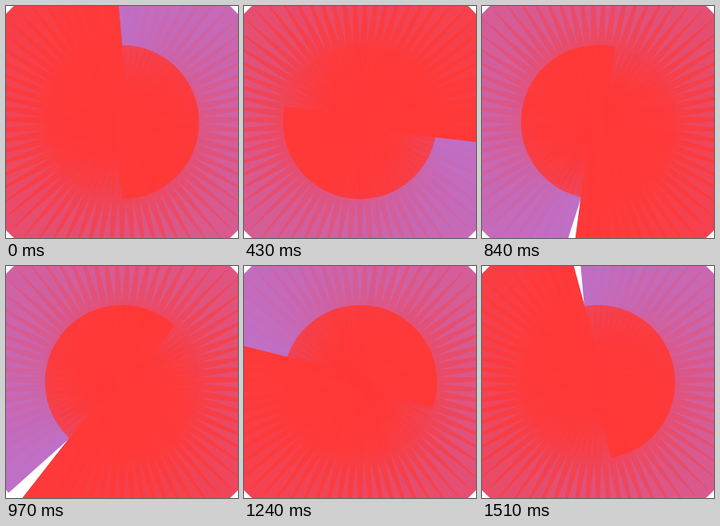
Write an HTML page with a canvas that moves like this. It is 290 by 290 pixels and loops after 1.54 s.

```html
<!DOCTYPE html>
<html lang="en">
<head>
<meta charset="utf-8">
<title>Radial sweep</title>
<style>
  html, body { margin: 0; width: 100%; height: 100%; overflow: hidden; background: #fff; }
  canvas { display: block; }
</style>
</head>
<body>
<canvas id="stage" width="290" height="290"></canvas>
<script>
const ctx = document.getElementById('stage').getContext('2d');

const LOOP = 1540;        // ms
const POSES = 46;         // held poses per loop
const POSE_TICKS = 3.345; // length of a pose in 10 ms ticks
const BLADES = 71;
const LIFE = BLADES - 0.7; // a blade drops out shortly before it is renewed
const WIDTH = 17.5;
const TAIL = 96;          // reach behind the centre
const REACH = 198;        // reach ahead of the centre
const OLD = '#be70c8';
const FRESH = '#ff3938';

function drawBlade(index, color, alpha) {
  ctx.save();
  ctx.translate(145, 145);
  ctx.rotate(-Math.PI / 2 + index * 2 * Math.PI / BLADES);
  ctx.globalAlpha = alpha;
  ctx.fillStyle = color;
  ctx.fillRect(-TAIL, -WIDTH / 2, TAIL + REACH, WIDTH);
  ctx.restore();
}

function draw(ms) {
  const ticks = Math.floor((ms % LOOP) / 10);
  const pose = Math.min(POSES - 1, Math.floor((ticks + 0.5) / POSE_TICKS));
  const head = pose * BLADES / POSES;

  const alive = [];
  for (let index = 0; index < BLADES; index++) {
    const age = (head - index - 1 + 2 * BLADES) % BLADES;
    if (age < LIFE) alive.push({ index, age });
  }

  ctx.fillStyle = '#fff';
  ctx.fillRect(0, 0, 290, 290);
  // Overlapping translucent red bars over an opaque purple fan form the rays.
  for (const { index } of alive) drawBlade(index, OLD, 1);
  for (const { index, age } of alive) drawBlade(index, FRESH, 1 - age / BLADES);
}

function tick(now) {
  draw(now);
  requestAnimationFrame(tick);
}

draw(0);
requestAnimationFrame(tick);
</script>
</body>
</html>
```
